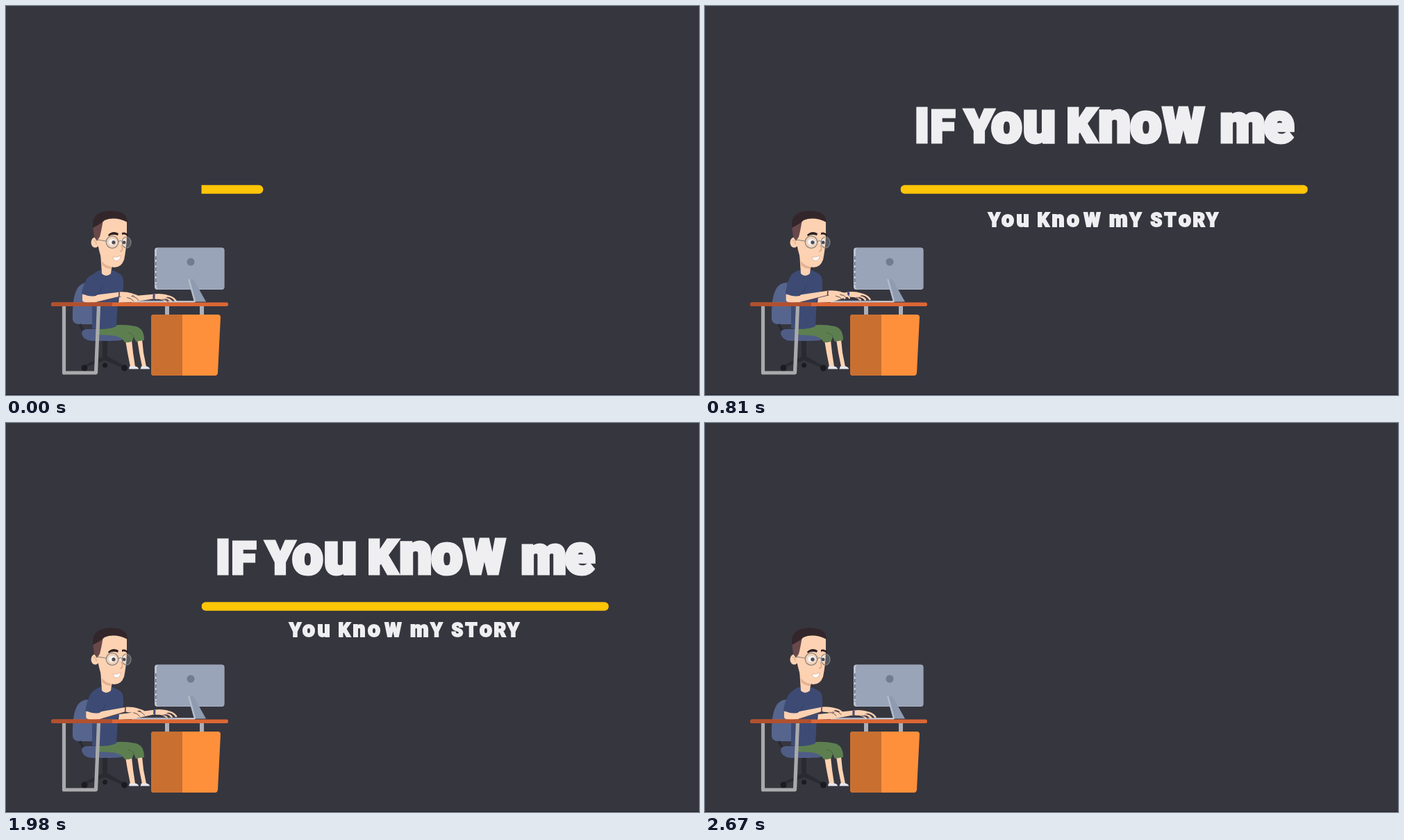
An HTML page that plays this animation: 998x561 px, repeating every 2.7 s.

```html
<!DOCTYPE html>
<html lang="en">
<head>
<meta charset="utf-8">
<title>If you know me</title>
<style>
html, body { margin: 0; width: 100%; height: 100%; overflow: hidden; background: #36363f; }
svg { display: block; width: 998px; height: 561px; }
text { font-family: Roboto, Inter, sans-serif; font-weight: 900; fill: #efeff2; stroke: #efeff2; white-space: pre; }
.skin { fill: #fdd2b2; }
.finger { fill: none; stroke: #fdd2b2; stroke-width: 2.6; stroke-linecap: round; }
.crease { fill: none; stroke: #5c4349; stroke-width: .9; stroke-linecap: round; }
</style>
</head>
<body>
<svg viewBox="0 0 998 561">
  <defs>
    <clipPath id="above"><rect x="270" y="100" width="620" height="147"/></clipPath>
    <clipPath id="below"><rect x="270" y="283" width="620" height="80"/></clipPath>
    <clipPath id="track"><rect x="281.5" y="250" width="600" height="30"/></clipPath>
    <g id="hand">
      <path class="skin" d="M-1 -3.500Q9 -5 18 -3L18 1Q8 5 -1 3Z"/>
      <path class="finger" d="M15 -1.500Q25 -2 30.500 5M11 1Q20 1 24 6M7 2Q13 3 17 6.500"/>
      <path class="crease" d="M17 1Q23 1 27.500 6M11 3.500Q17 4 20.500 8"/>
    </g>
  </defs>
  <rect width="998" height="561" fill="#36363f"/>
  <rect y="560" width="998" height="1" fill="#222229"/>

  <g clip-path="url(#above)"><text id="title" stroke-width="5"></text></g>
  <g clip-path="url(#below)"><text id="sub" stroke-width="1.800"></text></g>
  <g clip-path="url(#track)"><rect id="bar" y="258.200" width="586.500" height="12.500" rx="6.200" fill="#ffc507"/></g>

  <!-- chair -->
  <path d="M96 452Q95 420 103 407Q109 398 119 399L128 459H106Q97 459 96 452Z" fill="#56658d"/>
  <path d="M106 459L112 469" stroke="#2a2b33" stroke-width="4"/>
  <path d="M139 481H146V505L170 519L166 521L143 511L117 520L113 518L139 506Z" fill="#2a2a31"/>
  <g fill="#1b1b20"><circle cx="113" cy="522" r="4.500"/><circle cx="142.500" cy="518" r="3.500"/><circle cx="170.500" cy="522" r="4.500"/></g>
  <path d="M109 471Q110 466 118 466H174Q181 468 180 474Q176 483 150 483H124Q110 482 109 471Z" fill="#4f5d86"/>

  <!-- legs -->
  <path class="skin" d="M172 482H181L183 500L186 520H179L175 500ZM189 481H196L198 500L202 520H196L192 500Z"/>
  <path d="M178 519.500H186Q191 521 191 523.500H177ZM195 519.500H202Q207 521 207 523.500H193.500Z" fill="#e6e7f0"/>
  <path d="M129 466Q158 456 187 462Q199 465 199 482L187 484L184 477L182 483Q176 487 170 484Q168 477 152 475L133 474Z" fill="#5d7f50"/>
  <path d="M175 471Q182 472 184 477" fill="none" stroke="#48663f" stroke-width="1"/>

  <!-- neck, torso -->
  <path d="M124 388Q132 381 139 380H150Q160 383 166 388Q170 392 169 408L161 425L159 462Q145 468 124 465L124 430L118 400Z" fill="#3d4b74"/>
  <path class="skin" d="M136 356L153 370L151 386Q144 392 138 386Z"/>
  <path d="M138 368Q145 376 153 376L152 379Q143 379 138 373Z" fill="#e3b294"/>

  <!-- head -->
  <ellipse class="skin" cx="128.500" cy="341" rx="6" ry="7.500"/>
  <path d="M126 338Q130 338 130 344" fill="none" stroke="#d69f80"/>
  <path class="skin" d="M134 330L139 309Q156 301 174 310L174 333Q173 352 170 366Q166 377 156 377Q145 375 138 365Q133 352 132 340Z"/>
  <path d="M125 317L140 308Q137 326 135 333L131 339L127 333Z" fill="#69484a"/>
  <path d="M125 320Q124 305 132 300Q142 294 158 296Q171 297 174 306L175 312Q157 303 142 309Q137 314 125 320Z" fill="#33262a"/>
  <path d="M147 330Q154 323 162 328L161 331Q154 328 148 332ZM167 327Q172 325 176 330L175 332Q171 328 167 330Z" fill="#2d2022"/>
  <ellipse cx="153.500" cy="340.500" rx="5.500" ry="4.500" fill="#fff"/>
  <ellipse cx="169" cy="340.500" rx="4" ry="4.500" fill="#fff"/>
  <circle cx="155" cy="341" r="2.700" fill="#34262a"/>
  <circle cx="170" cy="341" r="2.500" fill="#34262a"/>
  <g fill="#c9d0d6" fill-opacity=".22" stroke="#86807c" stroke-width="1.200">
    <circle cx="153" cy="340.500" r="8.800"/><ellipse cx="173.500" cy="341" rx="6.500" ry="8"/>
    <path d="M162 340Q165 337 167 340M144 339L131 337" fill="none"/>
  </g>
  <path d="M166 345Q170 353 164 354" fill="none" stroke="#d79e80" stroke-width="1.200"/>
  <path d="M154 362Q160 363 165.500 360Q164 367.500 159 367.500Q155 367 154 362Z" fill="#fff" stroke="#d3a086" stroke-width=".6"/>

  <!-- computer -->
  <rect x="214" y="348.500" width="100.500" height="60.500" rx="4" fill="#bcc4d1"/>
  <rect x="217" y="349" width="97" height="59.500" rx="3.500" fill="#9aa4b8"/>
  <path d="M215.700 361V402" stroke="#5c6577" stroke-width="1.500" stroke-dasharray="5 3"/>
  <circle cx="266" cy="369" r="5.500" fill="#717c91"/>
  <path d="M262 394H270L288 426.500H271Z" fill="#8f9bb0"/>
  <path d="M262 394H264.500L273.500 426.500H271Z" fill="#b4bdcb"/>
  <path d="M181 426.500H272" stroke="#cdd2dc" stroke-width="2.500"/>
  <path d="M184 425H244" stroke="#727b90" stroke-width="1.500" stroke-dasharray="3 1.500"/>

  <!-- arms -->
  <path id="farArm" class="skin"/>
  <g id="farHand"><use href="#hand"/><path d="M-1 -3.500V3" stroke="#45477c" stroke-width="3"/></g>
  <path id="nearArm" class="skin"/>
  <g id="nearHand"><use href="#hand"/><path d="M-1 -3.500V3" stroke="#4b3c49" stroke-width="1.500"/></g>
  <path id="armLine" class="crease"/>
  <path id="sleeve" fill="#3d4b74"/>
  <path id="fold" fill="none" stroke="#313c61" stroke-width="1"/>

  <!-- desk -->
  <path d="M229 433H235V446H229ZM279 433H285V446H279Z" fill="#adb0b8"/>
  <path d="M83.500 432V529H129.500L133.500 432" fill="none" stroke="#aaaaac" stroke-width="5.200" stroke-linejoin="round"/>
  <rect x="65" y="427.500" width="255" height="5.500" rx="2.500" fill="#dc6634"/>
  <path d="M153 427.500H67.500Q65 427.500 65 430.200Q65 433 67.500 433H153Z" fill="#b1502e"/>
  <path d="M213 445H305Q309 445 309 449L305 529Q304.500 533 301 533H213Q209 533 209 529V449Q209 445 213 445Z" fill="#ff903b"/>
  <path d="M254 445H213Q209 445 209 449V529Q209 533 213 533H254Z" fill="#c97031"/>
</svg>
<script>
const LOOP = 2700;
const $ = id => document.getElementById(id);
const set = (id, name, value) => $(id).setAttribute(name, value);
const clamp = u => Math.min(1, Math.max(0, u));
const cubic = u => u < .5 ? 4 * u ** 3 : 1 - 4 * (1 - u) ** 3;
const ramp = (t, from, to) => cubic(clamp((t - from) / (to - from)));

// Uneven lettering: each glyph has its own start and size
function letter(id, y, glyphs) {
  for (const [ch, x, size] of glyphs) {
    const span = document.createElementNS("http://www.w3.org/2000/svg", "tspan");
    span.textContent = ch;
    span.setAttribute("x", x);
    span.setAttribute("y", y);
    span.setAttribute("font-size", size);
    $(id).append(span);
  }
}
letter("title", 195.5, [
  ["I", 302.5, 66], ["F ", 325, 63],
  ["Y", 374.5, 65], ["o", 412.5, 78], ["u ", 458, 83],
  ["K", 521, 66], ["n", 566.5, 83], ["o", 612.5, 80], ["W ", 659.5, 68],
  ["m", 741.5, 76], ["e", 805, 79]
]);
letter("sub", 318, [
  ["Y", 408, 27], ["o", 427, 32], ["u ", 448.5, 32],
  ["K", 478.5, 27], ["n", 499.5, 32], ["o", 521, 32], ["W ", 545.5, 27.5],
  ["m", 582, 31], ["Y ", 611.5, 27],
  ["S", 641.5, 27], ["T", 661.5, 27], ["o", 682, 32], ["R", 702.5, 27], ["Y", 722, 27]
]);

// time, sleeve x, near wrist x y turn, far wrist x y turn
const poses = [
  [0, 109, 164, 416, 5, 214, 419, 2],
  [300, 109, 164, 415, 5, 209, 416, -6],
  [540, 114, 173, 414, 0, 207, 417, 2],
  [1140, 118, 184, 414, 11, 208, 417, 3],
  [1680, 118, 184, 414, 10, 214, 414, 2],
  [2130, 113, 169, 413, 3, 215, 418, 2],
  [2670, 113, 169, 413, 3, 215, 418, 2],
  [LOOP, 109, 164, 416, 5, 214, 419, 2]
];
function poseAt(t) {
  const i = poses.findIndex(p => p[0] > t);
  const a = poses[i - 1], b = poses[i];
  const u = (t - a[0]) / (b[0] - a[0]), s = u * u * (3 - 2 * u);
  const tap = Math.sin(Math.PI * u * Math.round((b[0] - a[0]) / 135)) * 2;
  const p = a.map((v, k) => v + (b[k] - v) * s);
  p[4] += tap;
  p[6] -= Math.abs(tap);
  p[7] -= tap * 1.5;
  return p;
}

function drawArms(t) {
  const [, sx, nx, ny, nr, fx, fy, fr] = poseAt(t);
  set("farArm", "d", `M163 420L${fx} ${fy - 3.5}V${fy + 3}L182 427L162 428Z`);
  set("farHand", "transform", `translate(${fx} ${fy}) rotate(${fr})`);
  set("nearArm", "d", `M${sx + 1} 416L${sx + 18} 417L${nx} ${ny - 3.5}V${ny + 3}L${sx + 22} 427Q${sx + 4} 430 ${sx + 1} 425Z`);
  set("nearHand", "transform", `translate(${nx} ${ny}) rotate(${nr})`);
  set("armLine", "d", `M${sx + 22} 427L${nx} ${ny + 3}`);
  set("sleeve", "d", `M127 387Q${sx + 5} 388 ${sx} 414Q${sx + 10} 420 ${sx + 20} 418L148 406L146 390Z`);
  set("fold", "d", `M${sx + 20} 418Q${sx + 28} 412 ${sx + 30} 404`);
}

function draw(t) {
  const words = ramp(t, 62, 671) * (1 - ramp(t, 1755, 2364));
  const line = ramp(t, -134, 266) * (1 - ramp(t, 2170, 2570));
  set("title", "transform", `translate(0 ${105 * (1 - words)})`);
  set("sub", "transform", `translate(0 ${-50 * (1 - words)})`);
  set("bar", "x", 281.5 - 588 * (1 - line));
  drawArms(t);
}

const start = performance.now();
function tick() {
  draw((performance.now() - start) % LOOP);
  requestAnimationFrame(tick);
}
tick();
</script>
</body>
</html>
```
